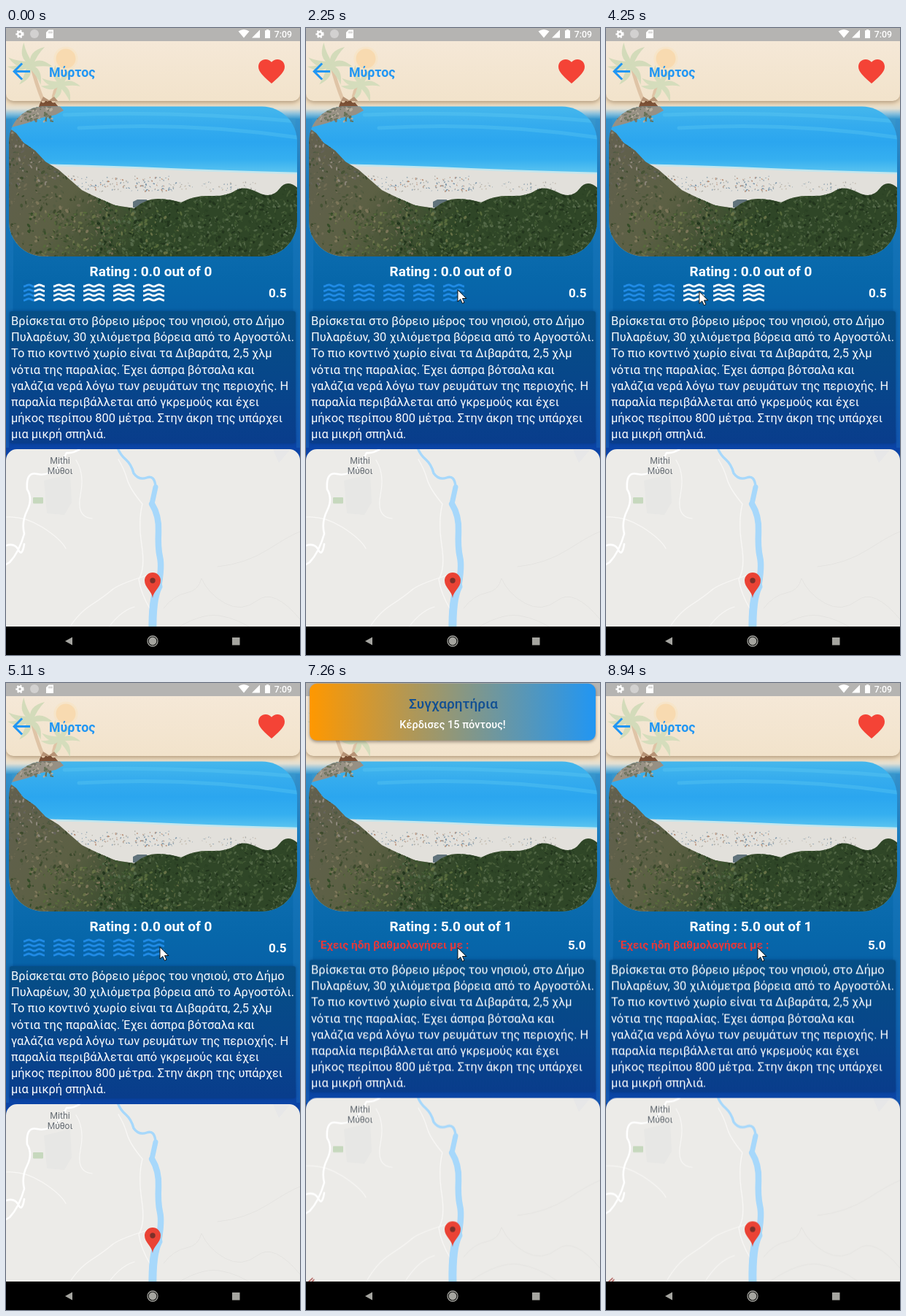
These frames come from a looping animation (403 px wide and 859 px high, 8990 ms). An HTML page with a canvas:

```html
<!DOCTYPE html>
<html lang="el">
<head>
<meta charset="utf-8">
<title>Μύρτος</title>
<style>
html, body { margin: 0; width: 100%; height: 100%; overflow: hidden; background: #0a50a0; }
canvas { display: block; width: 403px; height: 859px; }
</style>
</head>
<body>
<canvas id="stage"></canvas>
<script>
const W = 403, H = 859, LOOP = 8990;
const RATED = 5620, BAR_IN = 6850, BAR_OUT = 7840, BAR_TIME = 1000;
const FONT = 'Roboto, "Open Sans", sans-serif';
const dpr = window.devicePixelRatio || 1;

function layer(canvas) {
  canvas.width = W * dpr;
  canvas.height = H * dpr;
  const c = canvas.getContext('2d');
  c.scale(dpr, dpr);
  c.lineJoin = c.lineCap = 'round';
  return c;
}
const stage = document.getElementById('stage');
const main = layer(stage);
let g = main;

let seed = 7;
const rnd = (a = 0, b = 1) => {
  seed = (seed * 16807) % 2147483647;
  return a + (b - a) * seed / 2147483647;
};
const clamp = (v, a = 0, b = 1) => Math.min(b, Math.max(a, v));
const smooth = p => p * p * (3 - 2 * p);
const circOut = p => Math.sqrt(1 - (p - 1) ** 2);

function gradient(x0, y0, x1, y1, ...stops) {
  const f = g.createLinearGradient(x0, y0, x1, y1);
  stops.forEach((c, i) => f.addColorStop(i / (stops.length - 1), c));
  return f;
}
function rect(x, y, w, h, fill) {
  g.fillStyle = fill;
  g.fillRect(x, y, w, h);
}
function round(x, y, w, h, r, fill) {
  g.beginPath();
  g.roundRect(x, y, w, h, r);
  g.fillStyle = fill;
  g.fill();
}
function disc(x, y, r, fill) {
  g.beginPath();
  g.arc(x, y, r, 0, 7);
  g.fillStyle = fill;
  g.fill();
}
function shape(d, fill, x = 0, y = 0, s = 1) {
  g.save();
  g.translate(x, y);
  g.scale(s, s);
  g.fillStyle = fill;
  g.fill(new Path2D(d));
  g.restore();
}
function line(d, color, width) {
  g.strokeStyle = color;
  g.lineWidth = width;
  g.stroke(new Path2D(d));
}
function text(s, x, y, size, color, weight = 400, align = 'left') {
  g.font = `${weight} ${size}px ${FONT}`;
  g.fillStyle = color;
  g.textAlign = align;
  g.fillText(s, x, y);
}
function shadow(blur, dy, color) {
  g.shadowBlur = blur * dpr;
  g.shadowOffsetY = dy * dpr;
  g.shadowColor = color;
}

function palm(x, y, r, color) {
  for (let i = 0; i < 7; i++) {
    g.save();
    g.translate(x, y);
    g.rotate(-2.95 + i * 0.98);
    shape('M0 0Q.45 -.4 1 .12Q.5 .02 0 .14Z', color, 0, 0, r);
    g.restore();
  }
}

function drawBackdrop() {
  rect(0, 0, W, H, gradient(0, 110, 0, 580, '#3d9bd0', '#1273b5', '#0767aa', '#0759a4', '#0b43a6'));
  shape('M0 125L8 125Q14 340 4 575L0 575Z', 'rgba(40,130,200,.28)');
  shape('M403 125L397 125Q389 340 398 575L403 575Z', 'rgba(40,130,200,.28)');
  rect(0, 18, W, 106, gradient(0, 104, 0, 124, '#f1dfc3', '#e2dfd2', '#8cc1dc', '#3d9bd0'));
  shape('M45 108Q48 98 52 96L57 101 62 96 72 108Z', '#805339');
}

function drawAppBar() {
  g.save();
  shadow(6, 2, 'rgba(90,60,30,.45)');
  round(0, 18, W, 82, [0, 0, 10, 10], gradient(0, 18, 0, 100, '#f5e8d7', '#f2e3cb'));
  g.restore();
  disc(82, 42, 16.5, 'rgba(250,222,178,.35)');
  disc(82, 42, 13.5, '#f8dab0');
  line('M35 50Q41 76 51 100M74 77Q65 85 65 100', '#dfc4a6', 5);
  palm(33, 50, 31, '#d3dbba');
  palm(75, 77, 27, '#d5ddbc');
  shape('M48 100L51 94 59 99 66 94 71 100Z', '#b69375');
  shape('M20 11H7.83l5.59-5.59L12 4l-8 8 8 8 1.41-1.41L7.83 13H20v-2z', '#2196f3', 3, 41.5, 1.5);
  text('Μύρτος', 59, 67, 17.8, '#2196f3', 700);
  shape('M12 21.35l-1.45-1.32C5.4 15.36 2 12.28 2 8.5 2 5.42 4.42 3 7.5 3c1.74 0 3.41.81 4.5 2.09C13.09 3.81 14.76 3 16.5 3 19.58 3 22 5.42 22 8.5c0 3.78-3.4 6.86-8.55 11.54L12 21.35z',
    '#f44336', 342.4, 37.6, 1.8);
}

function drawStatus() {
  rect(0, 0, W, 18, '#b5b4b2');
  g.save();
  g.lineCap = 'butt';
  line('M22 8.3A3 3 0 1 1 16 8.3A3 3 0 1 1 22 8.3', '#fff', 2.6);
  g.setLineDash([2, 2.19]);
  line('M23.5 8.3A4.5 4.5 0 1 1 14.5 8.3A4.5 4.5 0 1 1 23.5 8.3', '#fff', 2.4);
  g.restore();
  disc(39, 8, 6, '#d2d1d0');
  shape('M58.5 2.5H65V14H55V6Z', '#fff');
  line('M59 5V7M61 5V7M63 5V7', '#b5b4b2', 1);
  shape('M318.5 4.5Q326 -.5 333.5 4.5L326 13.5Z', '#fff');
  shape('M348 2.5V13.5H337Z', '#fff');
  shape('M357 2H360V3.2H362V14H355V3.2H357Z', '#fff');
  text('7:09', 392, 13, 12.3, '#fff', 500, 'right');
}

const LAND = 'M0 134L14 144 24 157 40 168 54 183 72 194 88 208 104 222 124 232 150 243 176 247Q192 233 210 234T240 239Q258 229 280 230T314 223T345 225T375 220T403 222V320H0Z';

function specks(count, x0, y0, x1, y1, size, colors) {
  for (let i = 0; i < count; i++) {
    g.beginPath();
    g.ellipse(rnd(x0, x1), rnd(y0, y1), rnd(.5, size), rnd(.4, size * .6), rnd(0, 3), 0, 7);
    g.fillStyle = colors[i % colors.length];
    g.fill();
  }
}

function drawPhoto() {
  g.save();
  g.beginPath();
  g.roundRect(4, 107.5, 395, 205.5, 48);
  g.clip();
  rect(0, 105, W, 210, gradient(0, 108, 0, 204, '#45b7ec', '#35acee', '#2ba6ef', '#35aff0', '#66caf0'));
  line('M80 119Q230 113 400 128M100 137Q250 128 400 150', 'rgba(100,205,240,.3)', 5);
  shape('M50 186Q140 190 220 193T403 199V250H50Z', '#e2e0db');
  line('M70 188Q150 190 220 193T403 199', '#c2e6ee', 2.5);
  specks(150, 85, 203, 235, 224, 1.6, ['#8fa3b1', '#b4b2aa', '#b5886f', '#7894aa']);
  specks(50, 235, 211, 345, 224, 1.5, ['#b2b0ac', '#93a5b2', '#c5bcae']);
  shape('M174 238L180 235 193 235 195 246H174Z', '#61737b');
  shape('M0 105H72L79 113 68 119 49 123 30 130 0 138Z', '#979084');
  specks(90, 4, 108, 64, 128, 3.2, ['#777869', '#b7ad9d', '#657055']);
  shape(LAND, gradient(0, 150, 200, 275, '#62604f', '#5c6044', '#2f4627'));
  g.clip(new Path2D(LAND));
  specks(520, 0, 130, 150, 315, 3.4, ['#565d43', '#7c7659', '#465335', '#6f6b53', '#3d4a2d']);
  specks(1300, 125, 218, 403, 315, 3.4, ['#2b4224', '#3c5530', '#536848', '#22351d', '#465c38']);
  specks(240, 30, 250, 240, 315, 3.2, ['#566a3b', '#354c28', '#687247']);
  specks(150, 4, 135, 75, 215, 3, ['#4e5842', '#8e877b', '#65635a']);
  g.restore();
}

function drawMap() {
  g.save();
  g.beginPath();
  g.roundRect(0, 577, W, 300, 15);
  g.clip();
  rect(0, 570, W, 310, '#ecebe8');
  shape('M52 620L88 611 90 650 80 667 56 665Z', '#e7e7e5');
  shape('M366 577H390L374 596Z', '#e7e7e8');
  round(37, 643, 14, 8.5, 1, '#c6d8bd');
  const thin = '#f8f7f5', faint = '#e4e3e0', water = '#a7d8fb';
  line('M154 591Q162 604 166 618T187 652Q181 675 186 708T182 755Q185 775 197 795', thin, 1.4);
  line('M82 830Q96 804 116 791T145 770T193 750M135 830Q153 800 176 793', thin, 1.2);
  line('M96 592Q108 610 102 640T118 672M0 670Q25 668 50 684T82 713', thin, 1.2);
  line('M216 795Q230 777 247 774T268 754Q277 775 300 788T345 784T403 810', faint, 1);
  line('M225 828Q265 801 292 805T345 828M290 738Q329 734 360 714T403 690', faint, 1);
  line('M101 577Q92 583 83 582L75 597Q59 615 43 611T29 632Q37 645 29 661T25 693Q18 718 5 732L0 735M0 709Q12 705 17 715T25 707', '#fff', 2.6);
  line('M153 575Q156 584 164 591T175 610Q182 620 193 616T205 629', water, 3.4);
  line('M205 629L200 652', water, 7);
  line('M200 652Q210 668 209 690T211 725T209 765', water, 8.5);
  line('M209 765Q200 782 201 830', water, 11);
  text('Mithi', 74, 597, 12.3, '#626970', 400, 'center');
  text('Μύθοι', 74, 611, 12, '#626970', 400, 'center');
  line('M0 832L9 824M3 834L11 826', '#a54340', 1.2);
  shape('M201 781C200 771 190 767 190 757A11 11 0 0 1 212 757C212 767 202 771 201 781Z', '#ea4335');
  disc(201, 757, 3.7, '#7b3029');
  g.restore();
}

function drawNav() {
  rect(0, 820, W, 39, '#000');
  shape('M81 840L91 834.5V845.5Z', '#a5a5a0');
  disc(201, 840, 5.4, '#a5a5a0');
  line('M208 840A7 7 0 1 1 194 840A7 7 0 1 1 208 840', '#a5a5a0', 1.3);
  rect(310, 835, 10.5, 10.5, '#a5a5a0');
}

const ABOUT = [
  'Βρίσκεται στο βόρειο μέρος του νησιού, στο Δήμο',
  'Πυλαρέων, 30 χιλιόμετρα βόρεια από το Αργοστόλι.',
  'Το πιο κοντινό χωρίο είναι τα Διβαράτα, 2,5 χλμ',
  'νότια της παραλίας. Έχει άσπρα βότσαλα και',
  'γαλάζια νερά λόγω των ρευμάτων της περιοχής. Η',
  'παραλία περιβάλλεται από γκρεμούς και έχει',
  'μήκος περίπου 800 μέτρα. Στην άκρη της υπάρχει',
  'μια μικρή σπηλιά.'
];

function drawAbout() {
  g.save();
  shadow(4, 0, 'rgba(0,40,95,.5)');
  round(5, 388, 392, 181, 3, gradient(0, 388, 0, 569, '#064f86', '#07478a', '#093d8c'));
  g.restore();
  ABOUT.forEach((s, i) => text(s, 7, 407 + i * 22.2, 16.4, '#f8fafc', 400));
}

function waves(x, color) {
  g.strokeStyle = color;
  g.lineWidth = 2.8;
  g.lineCap = 'butt';
  for (let row = 0; row < 4; row++) {
    g.beginPath();
    for (let i = 0; i <= 29; i++) {
      g.lineTo(x + i, 353 + row * 6.35 + Math.cos(i * Math.PI / 7.25) * 1.1);
    }
    g.stroke();
  }
  g.lineCap = 'round';
}

function drawStars(value) {
  for (let i = 0; i < 5; i++) {
    const x = 24 + i * 41, part = clamp(value - i);
    if (part < 1) waves(x, '#fff');
    if (part === 0) continue;
    g.save();
    g.beginPath();
    g.rect(x - 1, 345, part < 1 ? 15.5 : 31, 34);
    g.clip();
    if (part < 1) rect(x - 1, 345, 15.5, 34, '#0764a8');
    waves(x, '#208be6');
    g.restore();
  }
}

// time, x, y of the pointer tip
const MOVES = [
  [300, -14, 470], [800, 32, 362], [1100, 32, 362], [1950, 208, 359], [2900, 208, 359],
  [3510, 28, 359], [3800, 28, 361], [4650, 211, 362], [6950, 211, 362], [7150, 208, 363]
];

function pointer(t) {
  let i = 0;
  while (i < MOVES.length - 2 && t > MOVES[i + 1][0]) i++;
  const [t0, x0, y0] = MOVES[i], [t1, x1, y1] = MOVES[i + 1];
  const p = smooth(clamp((t - t0) / (t1 - t0)));
  return [x0 + (x1 - x0) * p, y0 + (y1 - y0) * p];
}

function drawPointer(t) {
  const [x, y] = pointer(t);
  g.save();
  g.translate(x, y);
  const d = 'M0 0V16L3.8 12.5 6.4 18.3 9 17.2 6.5 11.5H11.5Z';
  shape(d, '#fff');
  line(d, '#111', 1);
  g.restore();
}

function rating(t) {
  if (t < 1050) return .5;
  const [x] = pointer(t - 120);
  return clamp(Math.ceil((x - 18) / 41 * 2) / 2, .5, 5);
}

function drawBanner(t) {
  if (t < BAR_IN || t > BAR_OUT + BAR_TIME) return;
  const p = t < BAR_OUT ? (t - BAR_IN) / BAR_TIME : 1 - (t - BAR_OUT) / BAR_TIME;
  g.save();
  g.translate(0, 20 - 100 * (1 - circOut(clamp(p))));
  g.save();
  shadow(4, 2, 'rgba(60,50,40,.5)');
  round(5, 0, 392, 78, 10, gradient(5, 0, 397, 0, '#ff9800', '#2196f3'));
  g.restore();
  text('Συγχαρητήρια', 202, 34, 19, '#104f93', 500, 'center');
  text('Κέρδισες 15 πόντους!', 201, 61, 14.5, '#fff', 500, 'center');
  g.restore();
}

function cached(...parts) {
  const canvas = document.createElement('canvas');
  g = layer(canvas);
  parts.forEach(part => part());
  g = main;
  return canvas;
}
const back = cached(drawBackdrop, drawPhoto, drawAppBar, drawStatus);
const lower = cached(drawAbout, drawMap);

function draw(t) {
  const rated = t >= RATED;
  g.drawImage(back, 0, 0, W, H);
  g.drawImage(lower, 0, rated ? -8.5 : 0, W, H);
  drawNav();
  text(`Rating : ${rated ? '5.0 out of 1' : '0.0 out of 0'}`, 198.5, 340, 19, '#fff', 700, 'center');
  if (rated) {
    text('Έχεις ήδη βαθμολογήσει με :', 19, 363.5, 15.4, '#e5393b', 700);
    text('5.0', 383.5, 365, 17, '#fff', 700, 'right');
  } else {
    drawStars(rating(t));
    text('0.5', 384.5, 369, 17, '#fff', 700, 'right');
  }
  drawBanner(t);
  if (t > MOVES[0][0]) drawPointer(t);
}

const start = performance.now();
function tick() {
  draw((performance.now() - start) % LOOP);
  requestAnimationFrame(tick);
}
tick();
</script>
</body>
</html>
```
